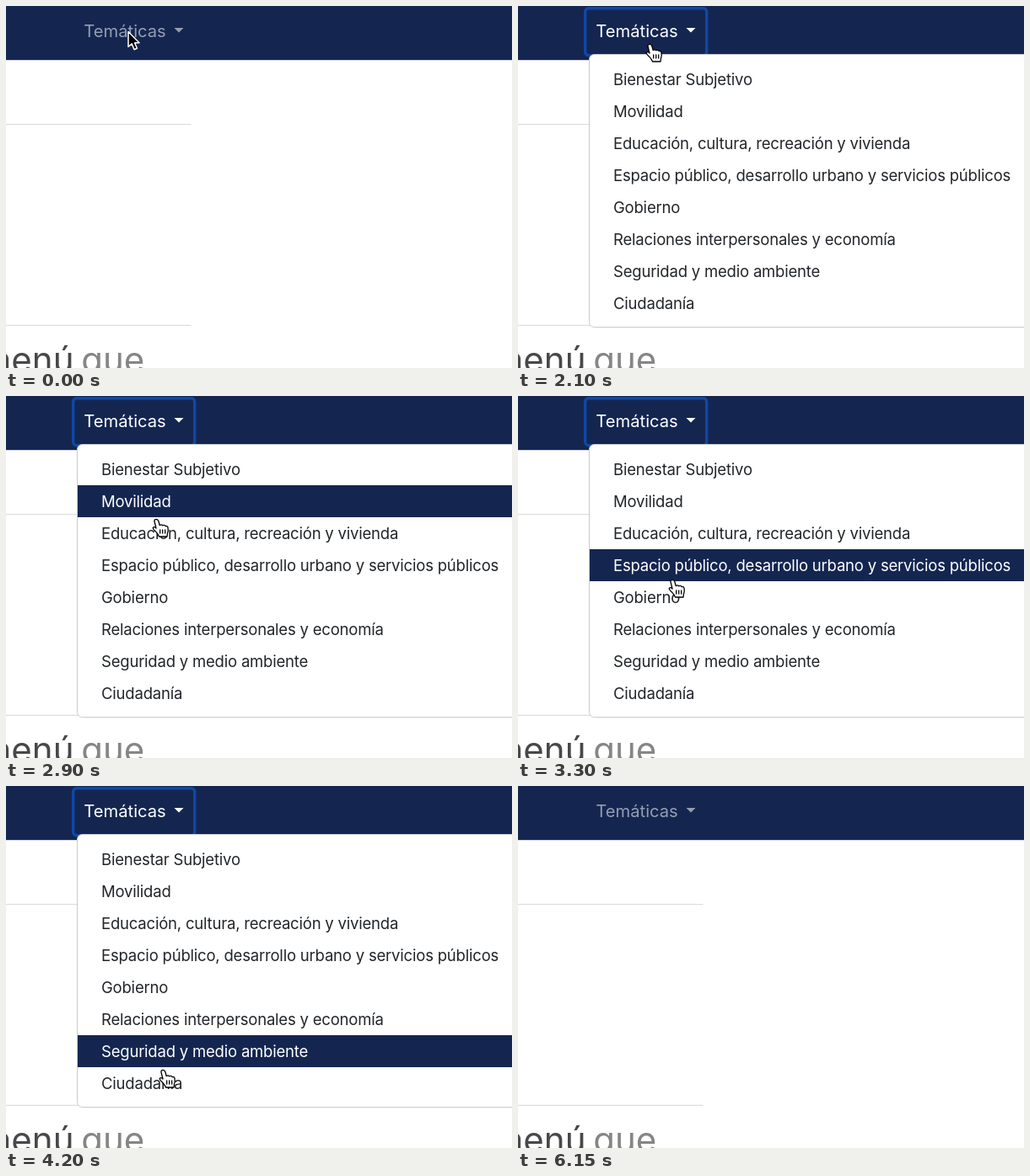
Recreate the animation shown at these times as an HTML page. Size 600 by 430 pixels, loop 6600 ms.

```html
<!DOCTYPE html>
<html lang="es">
<head>
<meta charset="utf-8">
<title>Menú de temáticas</title>
<style>
  html, body { margin: 0; width: 100%; height: 100%; overflow: hidden; background: #fff; }
  svg { display: block; width: 600px; height: 430px; }
  text { font-family: Inter, "Open Sans", sans-serif; }
  #items text { font-size: 18.5px; letter-spacing: -.2px; }
  .heading { font-size: 42px; }
</style>
</head>
<body>
<svg viewBox="0 0 600 430">
  <rect width="600" height="430" fill="#fff"/>
  <path d="M0 140.6H219.5M0 379.4H219.5" stroke="#dedede" stroke-width="1.3"/>
  <g class="heading">
    <text x="80.5" y="435" text-anchor="end" fill="#48484a">menú</text>
    <text x="89.3" y="435" fill="#868686">que</text>
  </g>

  <rect width="600" height="64.2" fill="#142650"/>
  <rect id="ring" x="79.7" y="2.7" width="144" height="56" rx="4" fill="none" stroke="#1048a4" stroke-width="3.4"/>
  <g id="toggle" fill="#fff">
    <text x="92.3" y="37" font-size="20.2">Temáticas</text>
    <path d="M199.5 26H210.5L205 31.5Z"/>
  </g>

  <g id="menu">
    <rect x="84.5" y="57.5" width="540" height="324" rx="6" fill="#fff" stroke="#c9cacd"/>
    <rect id="highlight" x="85" width="515" height="38" fill="#142650"/>
    <g id="items"></g>
  </g>

  <circle id="press" r="37" fill="none" stroke="#000" stroke-opacity=".6" stroke-width="4"/>
  <g id="cursor" stroke-linejoin="round" stroke-linecap="round">
    <path id="arrow" d="M0 0V18L4.2 14.4 7 21.2 10.4 19.8 7.6 13.2H13Z" fill="#000" stroke="#fff" stroke-width="1.5"/>
    <g id="hand" stroke="#000" stroke-width="1.3">
      <path fill="#fff" d="M-3 2Q-3.4-.5-.8-.7 1.2-.7 1.8 1.5L3.2 6.5Q5.5 5 6.8 6.8 9 5.6 10.2 7.6 12.6 7 13 9.5 13.8 13 12.4 16.5L12 20H2.5Q1.5 17-1 14.6-4.5 11.4-4.8 9.6-3.5 7.6-1 10Z"/>
      <path fill="none" d="M3.7 12V16M6.7 12V16M9.7 12V16"/>
    </g>
  </g>
</svg>
<script>
const LOOP = 6600, STEP = 50;
const ROW_TOP = 68, ROW_HEIGHT = 38, HOVER_LAG = 60;
const OPEN = 1250, CLOSE = 6050;
const labels = [
  'Bienestar Subjetivo', 'Movilidad', 'Educación, cultura, recreación y vivienda',
  'Espacio público, desarrollo urbano y servicios públicos', 'Gobierno',
  'Relaciones interpersonales y economía', 'Seguridad y medio ambiente', 'Ciudadanía'
];
// Pointer path: time, x, y
const path = [
  [0, 145, 30.5], [350, 145, 30.5], [500, 156, 32], [1500, 156, 32], [1900, 156, 37],
  [2100, 157, 46], [2600, 172, 95], [2900, 179, 147], [3300, 184, 219], [4000, 186, 318],
  [4200, 187, 338], [4700, 187, 355], [5450, 187, 356], [5600, 187, 368],
  [5650, 189, 391], [5700, 191, 440], [LOOP, 191, 440]
];

const $ = id => document.getElementById(id);
const show = (id, on) => $(id).setAttribute('visibility', on ? 'inherit' : 'hidden');
const ramp = (t, start, end) => Math.min(1, Math.max(0, (t - start) / (end - start)));

const items = labels.map((label, i) => {
  const text = document.createElementNS('http://www.w3.org/2000/svg', 'text');
  text.textContent = label;
  text.setAttribute('x', 113);
  text.setAttribute('y', ROW_TOP + ROW_HEIGHT * i + 25.8);
  return $('items').appendChild(text);
});

function pointer(t) {
  const i = path.findIndex(point => point[0] > t);
  const [t0, x0, y0] = path[i - 1], [t1, x1, y1] = path[i];
  const u = (t - t0) / (t1 - t0);
  return [x0 + (x1 - x0) * u, y0 + (y1 - y0) * u];
}

function draw(t) {
  const [x, y] = pointer(t);
  const isOpen = t >= OPEN && t < CLOSE;

  const hover = ramp(t, 350, 500);
  const focus = ramp(t, OPEN - 50, OPEN + 100);
  const blur = 1 - ramp(t, CLOSE - 50, CLOSE + 100);
  const active = t < CLOSE ? focus : blur;
  const idle = .55 + .2 * (t < CLOSE ? hover : blur);
  $('toggle').setAttribute('fill-opacity', idle + (1 - idle) * active);
  $('ring').setAttribute('opacity', t < OPEN ? 0 : active);

  const hoverY = pointer(Math.max(0, t - HOVER_LAG))[1];
  const row = Math.floor((hoverY - ROW_TOP) / ROW_HEIGHT);
  const hasRow = isOpen && row >= 0 && row < labels.length;
  show('menu', isOpen);
  show('highlight', hasRow);
  if (hasRow) $('highlight').setAttribute('y', ROW_TOP + ROW_HEIGHT * row);
  items.forEach((item, i) => item.setAttribute('fill', hasRow && i === row ? '#fff' : '#212529'));

  const isHand = t >= 400 && y < 382;
  $('cursor').setAttribute('transform', `translate(${x} ${y})`);
  show('hand', isHand);
  show('arrow', !isHand);

  $('press').setAttribute('cx', x);
  $('press').setAttribute('cy', y - 1);
  show('press', t >= 1000 && t < 1100);
}

function frame(now) {
  draw(Math.floor(now % LOOP / STEP) * STEP);
  requestAnimationFrame(frame);
}
draw(0);
requestAnimationFrame(frame);
</script>
</body>
</html>
```
